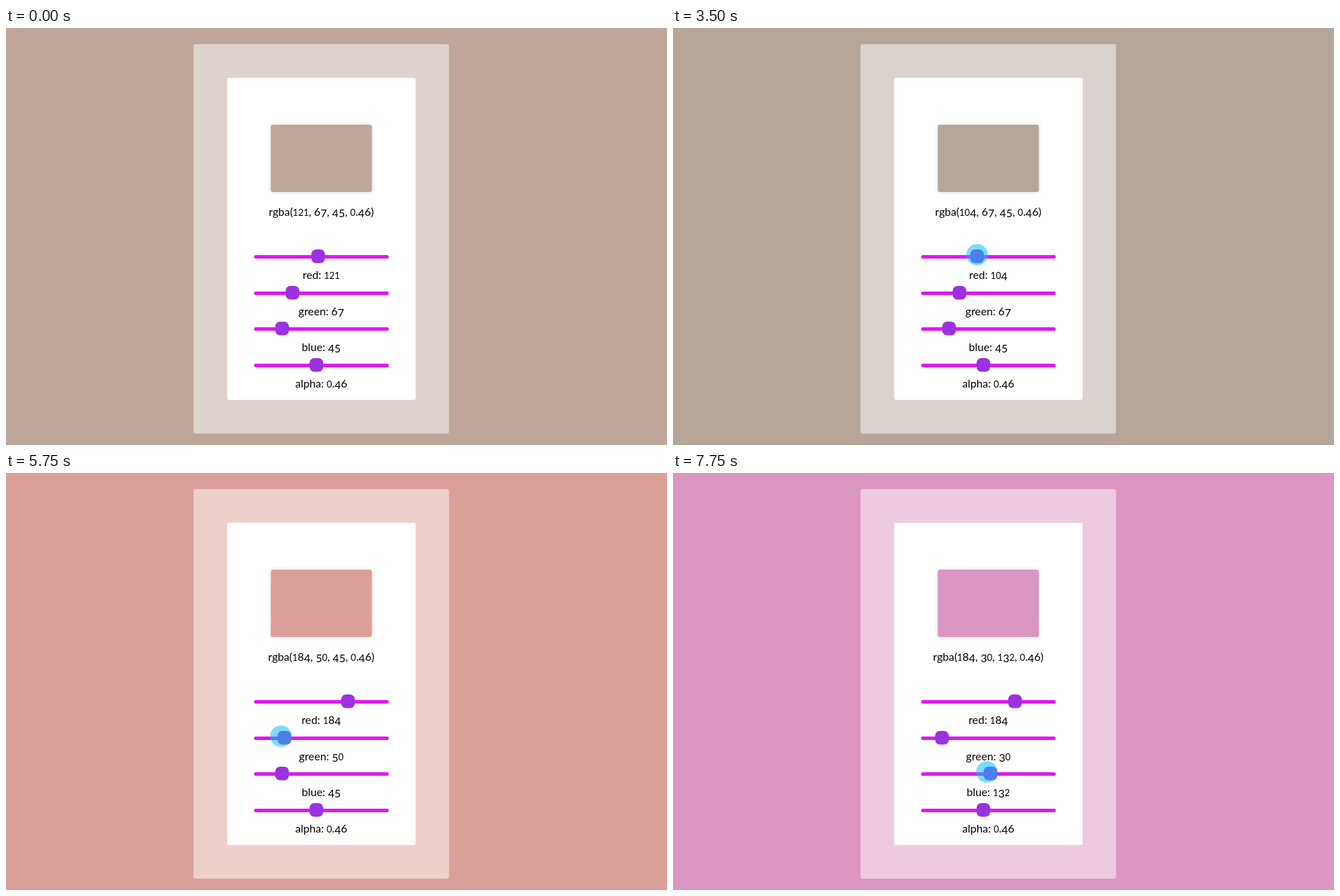
Recreate the animation shown at these times as an HTML page with a canvas. Size 942x595 px, loop 8 s.

```html
<!DOCTYPE html>
<html lang="en">
<head>
<meta charset="utf-8">
<title>Colour mixer</title>
<style>
  html, body { margin: 0; width: 100%; height: 100%; overflow: hidden; }
  canvas { display: block; }
</style>
</head>
<body>
<canvas id="stage" width="942" height="595"></canvas>
<script>
const ctx = document.getElementById('stage').getContext('2d');
const LOOP = 8000, TICK = 250, MID = 449.3, ALPHA = 0.46;
const KNOB = 19.6, TRACK = 192, LEFT = 353.5;

// Times are in ticks. Each channel slides evenly from value to value.
const channels = [
  { name: 'red', start: 121, moves: [{ from: 12, to: 13, value: 77 }, { from: 13, to: 17, value: 184 }] },
  { name: 'green', start: 67, moves: [{ from: 18, to: 19, value: 82 }, { from: 19.8, to: 25, value: 30 }] },
  { name: 'blue', start: 45, moves: [{ from: 27, to: 28, value: 116 }, { from: 28, to: 31, value: 132 }] }
];

// The pointer glides to a hover point, waits, then drags the knob of that row.
const drags = [
  { leave: 3, arrive: 8, press: 12, release: 17, x: 425, y: 338, grip: 0 },
  { leave: 17, arrive: 19, press: 20, release: 25, x: 417, y: 390, grip: -5 },
  { leave: 25, arrive: 28, press: 29, release: 31, x: 441, y: 438, grip: -5 }
];
const entry = { x: 477, y: 102 };

const mix = (a, b, p) => a + (b - a) * p;
const progress = (t, a, b) => Math.min(1, Math.max(0, (t - a) / (b - a)));
const easeOut = p => 1 - (1 - p) ** 2;
const trackTop = row => Math.round(324 + row * 51.7);
const knobLeft = share => LEFT - 0.3 + share * (TRACK - KNOB);

const valueAt = (row, t) => Math.round(channels[row].moves.reduce(
  (v, m) => mix(v, m.value, progress(t, m.from, m.to)), channels[row].start));

function box(x, y, w, h, r, fill) {
  ctx.fillStyle = fill;
  ctx.beginPath();
  ctx.roundRect(x, y, w, h, r);
  ctx.fill();
}

// Centred text with old-style figures: 0-2 small, 3 4 5 7 9 hanging.
function label(text, y) {
  const runs = text.match(/[012]+|[34579]+|[^0-579]+/g).map(s => {
    const font = (/[012]/.test(s) ? 13 : 15.7) + 'px Lato, sans-serif';
    ctx.font = font;
    return { s, font, w: ctx.measureText(s).width, drop: /[34579]/.test(s) ? 2.5 : 0 };
  });
  let x = MID - runs.reduce((sum, r) => sum + r.w, 0) / 2;
  ctx.fillStyle = '#000';
  for (const r of runs) {
    ctx.font = r.font;
    ctx.fillText(r.s, x, y + r.drop);
    x += r.w;
  }
}

function slider(row, name, value, max) {
  const y = trackTop(row);
  box(LEFT, y, TRACK, 5, 2.5, '#df17f3');
  box(knobLeft(value / max), y - 8, KNOB, KNOB, 7, '#9a32e0');
  label(name + ': ' + value, y + 33.5);
}

function grabPoint(row, t) {
  return {
    x: knobLeft(valueAt(row, t) / 255) + KNOB / 2 + drags[row].grip,
    y: trackTop(row) - 0.5
  };
}

function pointer(t) {
  const row = drags.findLastIndex(d => t >= d.leave && (d.leave === 3 || t > d.leave));
  if (row < 0) return;
  const d = drags[row], down = t >= d.press;
  let p;
  if (down) {
    p = grabPoint(row, t);
  } else {
    const from = row ? grabPoint(row - 1, d.leave) : entry;
    const k = easeOut(progress(t, d.leave, d.arrive));
    p = { x: mix(from.x, d.x, k), y: mix(from.y, d.y, k) };
  }
  ctx.beginPath();
  ctx.arc(p.x, p.y, down ? 15.3 : 19.5, 0, Math.PI * 2);
  if (down) {
    ctx.fillStyle = 'rgba(10,193,248,0.54)';
    ctx.fill();
  } else {
    ctx.strokeStyle = 'rgba(10,193,248,0.2)';
    ctx.lineWidth = 3;
    ctx.stroke();
  }
}

function draw(t) {
  const rgb = channels.map((c, row) => valueAt(row, t));
  const tone = [0.983, 0.987, 0.973];
  const fill = `rgb(${rgb.map((v, i) => Math.round(mix(255, v, ALPHA) * tone[i]))})`;

  ctx.fillStyle = fill;
  ctx.fillRect(0, 0, 942, 595);
  box(267.2, 23, 364.2, 555.7, 3, 'rgba(255,255,255,0.5)');
  box(315.2, 71, 268.6, 459.8, 3, '#fff');

  ctx.shadowColor = 'rgba(0,0,0,0.15)';
  ctx.shadowBlur = 6;
  box(377.4, 138, 144, 96, 3, fill);
  ctx.shadowColor = 'transparent';

  label(`rgba(${rgb.join(', ')}, ${ALPHA})`, 267.5);
  channels.forEach((c, row) => slider(row, c.name, rgb[row], 255));
  slider(3, 'alpha', ALPHA, 1);
  pointer(t);
}

function frame() {
  draw(Math.floor(performance.now() % LOOP / TICK));
  requestAnimationFrame(frame);
}
frame();
</script>
</body>
</html>
```
